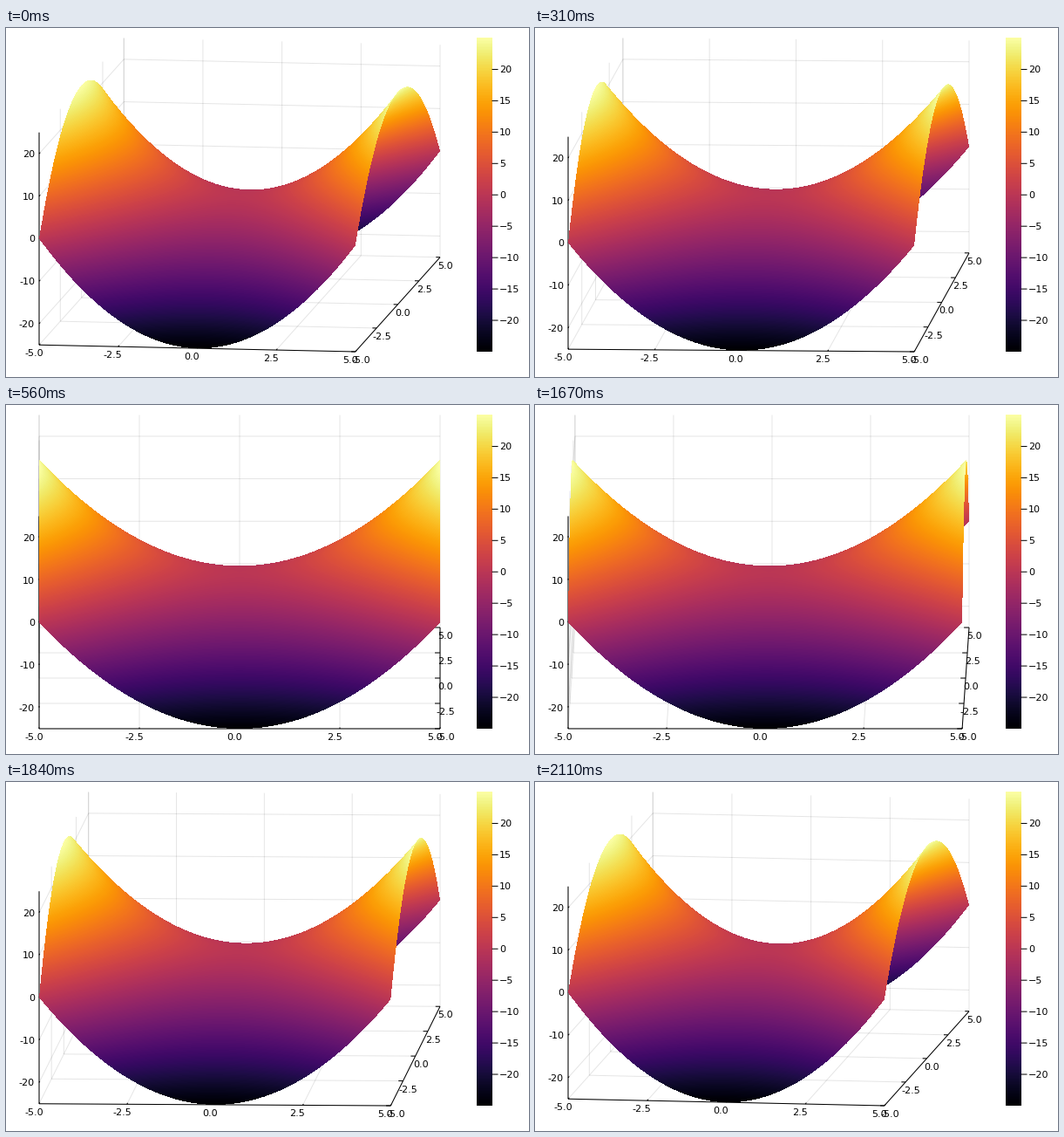
Animation of 600 by 400 pixels, one loop 2220 ms. Source, as a matplotlib script:

```python
import math

import numpy as np
import matplotlib.pyplot as plt
from matplotlib.animation import FuncAnimation
from matplotlib.collections import LineCollection

W, H, DPI = 600, 400, 100
LEFT, TOP, BOTTOM, SPAN = 38, 11.5, 371, 460
DEPTH, HEIGHT = 116, 243.5      # vertical pixels taken by the floor and by the z axis
STEPS, TICKS = 100, 222         # camera steps and 10 ms ticks per loop
XY_TICKS = [-5, -2.5, 0, 2.5, 5]
Z_TICKS = [-20, -10, 0, 10, 20]
PX = 72 / DPI
FONT = dict(family="DejaVu Sans", fontsize=8, color="black", zorder=5)
INFERNO = plt.get_cmap("inferno")

fig = plt.figure(figsize=(W / DPI, H / DPI), dpi=DPI, facecolor="white")
ax = fig.add_axes([0, 0, 1, 1])


def project(rot, x, y, z):
    c, s = math.cos(rot), math.sin(rot)
    px = LEFT + SPAN * (c * (x + 5) + s * (y + 5)) / (10 * (c + s))
    floor = DEPTH * (s * s * (5 - x) + c * c * (y + 5)) / 10
    return px, BOTTOM - floor - HEIGHT * (z + 25) / 50


def render_surface(rot):
    """Per pixel, solve for the nearest point of z = x^2 - y^2 on the view ray."""
    c, s = math.cos(rot), math.sin(rot)
    q = s / c
    px, py = np.meshgrid(np.arange(W) + 0.5, np.arange(H) + 0.5)
    p = 10 * (px - LEFT) / SPAN * (c + s) / c - 5 - 5 * q
    d, h = DEPTH / 10, HEIGHT / 50
    qa = h * (q * q - 1)
    qb = d * (s * s * q + c * c) - 2 * h * p * q
    qc = d * (s * s * (5 - p) + 5 * c * c) + h * (p * p + 25) - (BOTTOM - py)
    disc = qb * qb - 4 * qa * qc
    root = np.sqrt(np.maximum(disc, 0))
    img = np.zeros((H, W, 4), np.uint8)
    for sign in (-1, 1):        # far side first, near side over it
        y = (-qb + sign * root) / (2 * qa)
        x = p - q * y
        hit = (disc >= 0) & (abs(x) <= 5) & (abs(y) <= 5)
        z = (x * x - y * y)[hit]
        img[hit] = INFERNO((z + 25) / 50, bytes=True)
    return img


def grid_points():
    for t in XY_TICKS:
        yield (t, -5, -25), (t, 5, -25)
        yield (t, 5, -25), (t, 5, 25)
        yield (5, t, -25), (-5, t, -25)
        yield (-5, t, -25), (-5, t, 25)
    for t in Z_TICKS:
        yield (-5, -5, t), (-5, 5, t)
        yield (-5, 5, t), (5, 5, t)


def axis_points():
    yield (-5, -5, -25), (5, -5, -25)
    yield (5, -5, -25), (5, 5, -25)
    yield (-5, -5, -25), (-5, -5, 25)
    size = 0.13
    for t in XY_TICKS:
        yield (t, -5, -25), (t, -5 + size, -25)
        yield (5, t, -25), (5 - size, t, -25)
    for t in Z_TICKS:
        yield (-5, -5, t), (-5, -5 + size, t)


GRID, AXES = list(grid_points()), list(axis_points())


def segments(rot, pairs):
    return [[project(rot, *a), project(rot, *b)] for a, b in pairs]


def lines(color, zorder):
    group = LineCollection([], colors=[color], linewidths=PX, zorder=zorder)
    group.set_snap(False)
    ax.add_collection(group)
    return group


def label(text, align):
    return ax.text(0, 0, text, ha=align, va="baseline", **FONT)


# Each label: artist, anchor in space, pixel offset to its baseline
labels = []
for t in XY_TICKS:
    labels.append((label(f"{t:.1f}", "center"), (t, -5, -25), (-6, 13)))
    labels.append((label(f"{t:.1f}", "center"), (5, t, -25), (6, 13)))
for t in Z_TICKS:
    labels.append((label(str(t), "right"), (-5, -5, t), (-5, 4)))

grid = lines((0, 0, 0, 0.1), 1)
axes = lines("black", 2)

surfaces = [render_surface(math.radians(deg)) for deg in range(16)]
surface = ax.imshow(surfaces[15], extent=(0, W, H, 0), interpolation="nearest",
                    aspect="auto", zorder=3)

# Colour bar
ax.imshow(np.linspace(1, 0, 256)[:, None], cmap=INFERNO, interpolation="nearest",
          extent=(540, 558, BOTTOM, math.floor(TOP)), aspect="auto", zorder=3)
for v in range(-20, 21, 5):
    y = BOTTOM - (BOTTOM - TOP) * (v + 25) / 50
    ax.plot([558, 564], [y, y], color="black", lw=PX, snap=False, zorder=4)
    ax.text(566, y + 4, str(v).replace("-", "\u2212"), va="baseline", **FONT)

ax.set_xlim(0, W)
ax.set_ylim(H, 0)
ax.axis("off")


def draw(tick):
    step = int((tick + 0.5) * STEPS / TICKS)
    # The camera swings as a cosine and stops at the front view
    deg = max(0, round(15 * math.cos(2 * math.pi * step / (STEPS - 1))))
    rot = math.radians(deg)
    surface.set_data(surfaces[deg])
    grid.set_segments(segments(rot, GRID))
    axes.set_segments(segments(rot, AXES))
    for text, anchor, (dx, dy) in labels:
        x, y = project(rot, *anchor)
        text.set_position((x + dx, y + dy))
    return [surface, grid, axes]


anim = FuncAnimation(fig, draw, frames=TICKS, interval=10, repeat=True,
                     repeat_delay=0, blit=False)
plt.show()
```
